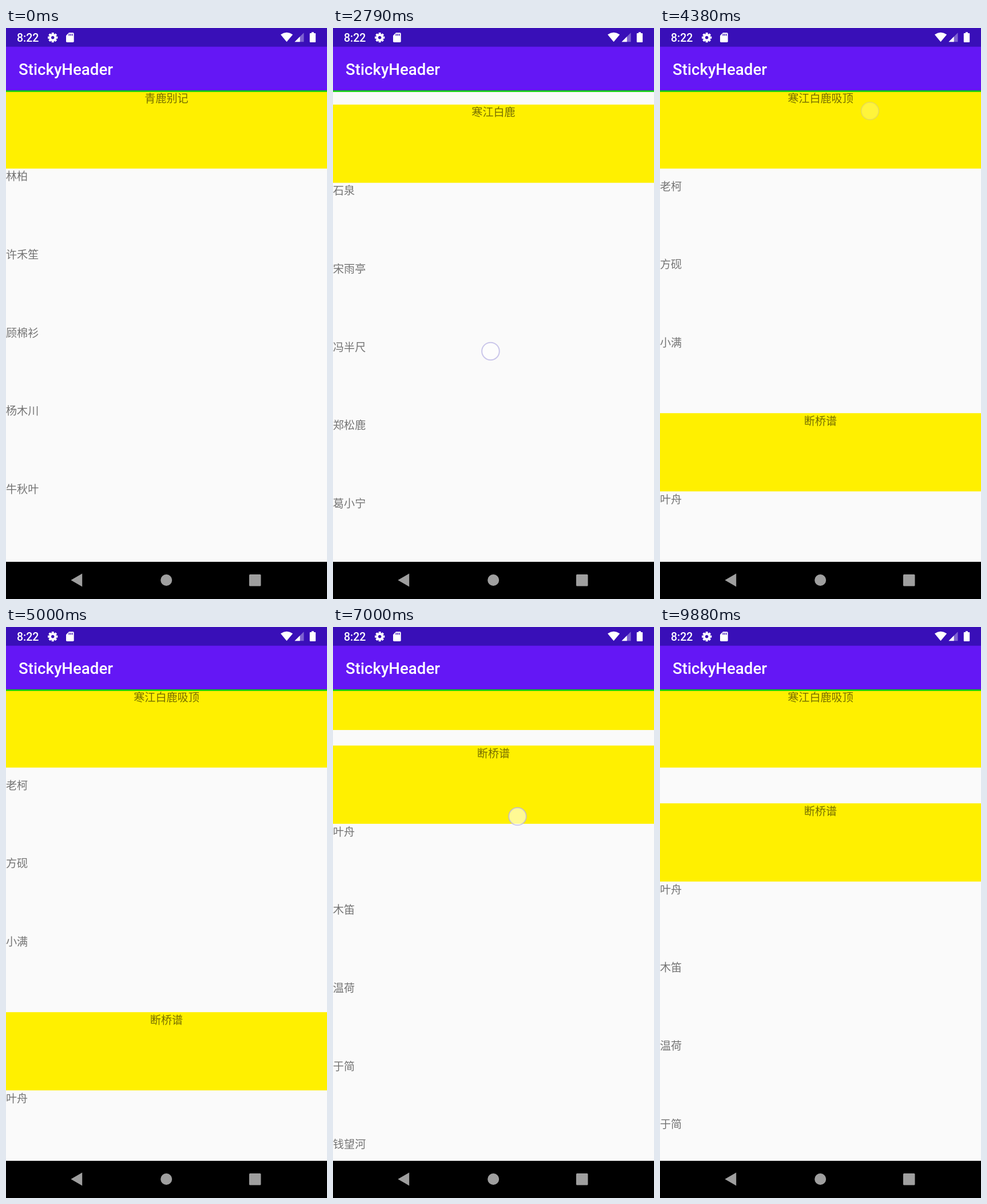
Write an HTML page that moves like this. It is 561 px wide and 998 px high and loops after 9970 ms.

```html
<!DOCTYPE html>
<html lang="zh">
<head>
<meta charset="utf-8">
<title>StickyHeader</title>
<style>
html, body { margin: 0; width: 100%; height: 100%; overflow: hidden; background: #fafafa; }
svg { display: block; width: 561px; height: 998px; }
.row text { font: 19.1px "Noto Sans CJK SC", "Noto Sans CJK", "Noto Sans", sans-serif; fill: #000; fill-opacity: .54; }
.ui { font-family: Roboto, sans-serif; font-weight: 500; fill: #fff; }
</style>
</head>
<body>
<svg viewBox="0 0 561 998">
  <rect width="561" height="998" fill="#fafafa"/>
  <g id="list"></g>
  <g id="sticky"></g>
  <rect width="561" height="109" fill="#6417f5"/>
  <rect y="109" width="561" height="2.7" fill="#0ccc0c"/>
  <rect width="561" height="32.7" fill="#390fb8"/>
  <text class="ui" x="19" y="24" font-size="19.5">8:22</text>
  <text class="ui" x="22" y="81.6" font-size="27.65">StickyHeader</text>
  <g fill="#fff">
    <g id="gear" transform="translate(81.7 16.7)">
      <circle r="4.6" fill="none" stroke="#fff" stroke-width="3.6"/>
    </g>
    <path d="M110 8.3h7q1.7 0 1.7 1.7v13.3q0 1.7-1.7 1.7h-10.3q-1.7 0-1.7-1.7v-10z"/>
    <path d="M110.3 10.2v3.4m2.8-3.4v3.4m2.8-3.4v3.4" stroke="#390fb8" stroke-width="1.5"/>
    <path d="M490.5 24.3L480 11.4Q490.5 4 501.2 11.4z"/>
    <path d="M504.5 24.3l16-16v16z" opacity=".35"/>
    <path d="M504.5 24.3l9.2-9.2v9.2z"/>
    <path d="M534 7.3h4V9h2.2q1 0 1 1v14q0 1-1 1h-8.4q-1 0-1-1V10q0-1 1-1h2.2z"/>
  </g>
  <rect y="933" width="561" height="65"/>
  <g fill="#9f9f9f">
    <path d="M113.4 965l19.8-11.4v22.800z"/>
    <circle cx="280.2" cy="965" r="10"/>
    <rect x="425" y="955" width="20.5" height="20.5" rx="1.5"/>
  </g>
  <circle id="touch" r="15.3" fill="#fff" fill-opacity=".58" stroke="#b8b2e4" stroke-opacity=".72" stroke-width="2"/>
</svg>
<script>
const NS = "http://www.w3.org/2000/svg";
const LOOP = 9970, TOP = 109, ROW = 136.7, GAP = 27.2, FADE = 120;
const $ = id => document.getElementById(id);

const sections = [
  ["青鹿别记", "林柏", "许禾笙", "顾棉衫", "杨木川", "牛秋叶", "邹石桥"],
  ["寒江白鹿", "石泉", "宋雨亭", "冯半尺", "郑松鹿", "葛小宁", "老柯", "方砚", "小满"],
  ["断桥谱", "叶舟", "木笛", "温荷", "于简", "钱望河", "白芦"]
];

// finger moves in a straight line; the list follows it, then coasts by fling
const drags = [
  { start: 2040, end: 2290, from: [300, 800], to: [288, 450], fling: 447, coast: 340 },
  { start: 2640, end: 2960, from: [268, 700], to: [284, 410], fling: 363, coast: 600 },
  { start: 4040, end: 4300, from: [352, 318], to: [367, 145], fling: 0, coast: 1 },
  { start: 5290, end: 5870, from: [300, 679], to: [336, 254], fling: 75, coast: 400 },
  { start: 6710, end: 7860, from: [326, 297], to: [312, 432], fling: 0, coast: 1 }
];

const clamp = v => Math.min(1, Math.max(0, v));
const easeOut = p => 1 - (1 - p) ** 2;
const mix = (a, b, p) => a + (b - a) * p;
const progress = (d, t) => clamp((t - d.start) / (d.end - d.start));

function add(parent, tag, attrs, text) {
  const el = document.createElementNS(NS, tag);
  for (const k in attrs) el.setAttribute(k, attrs[k]);
  if (text) el.textContent = text;
  return parent.appendChild(el);
}

function makeRow(parent, label, header) {
  const g = add(parent, "g", { class: "row" });
  if (header) add(g, "rect", { width: 561, height: ROW, fill: "#fff000" });
  add(g, "text", { x: header ? 280.5 : 0, y: 20.6, "text-anchor": header ? "middle" : "start" }, label);
  return g;
}

const place = (el, y) => el.setAttribute("transform", `translate(0 ${y.toFixed(2)})`);

for (let i = 0; i < 8; i++)
  add($("gear"), "rect", { x: -2, y: -8.6, width: 4, height: 4, rx: .6, transform: `rotate(${i * 45})` });

const headTops = [];
let rows = 0;
for (const names of sections) {
  headTops.push(TOP + rows * ROW);
  names.forEach((name, i) => place(makeRow($("list"), name, i === 0), TOP + ROW * rows++));
}
const stickies = sections.map(s => makeRow($("sticky"), s[0] + "吸顶", true));

// each half second: one short step, then steps of 83 ms
function step(t) {
  const m = t % 500;
  return t - m + (m < 40 ? 0 : 40 + 83 * Math.min(4, Math.floor((m - 40) / 83)));
}

function scrollAt(t) {
  return drags.reduce((sum, d) => sum
    + (d.from[1] - d.to[1]) * progress(d, t)
    + d.fling * easeOut(clamp((t - d.end) / d.coast)), 0);
}

function drawList(s) {
  place($("list"), -s);
  const tops = headTops.map(y => y - s);
  const current = tops.filter(y => y < TOP).length - 1;
  stickies.forEach((el, i) => {
    el.style.display = i === current ? "" : "none";
    const next = tops[i + 1] ?? Infinity;
    place(el, Math.min(TOP, next - GAP - ROW));
  });
}

function drawTouch(t) {
  const d = drags.find(d => t >= d.start && t < d.end + FADE);
  const touch = $("touch");
  touch.setAttribute("opacity", d ? 1 - clamp((t - d.end) / FADE) : 0);
  if (!d) return;
  const p = progress(d, t);
  touch.setAttribute("cx", mix(d.from[0], d.to[0], p));
  touch.setAttribute("cy", mix(d.from[1], d.to[1], p));
}

function draw(now) {
  const t = step(now % LOOP);
  drawList(scrollAt(t));
  drawTouch(t);
}

function loop(now) {
  draw(now);
  requestAnimationFrame(loop);
}
draw(0);
requestAnimationFrame(loop);
</script>
</body>
</html>
```
